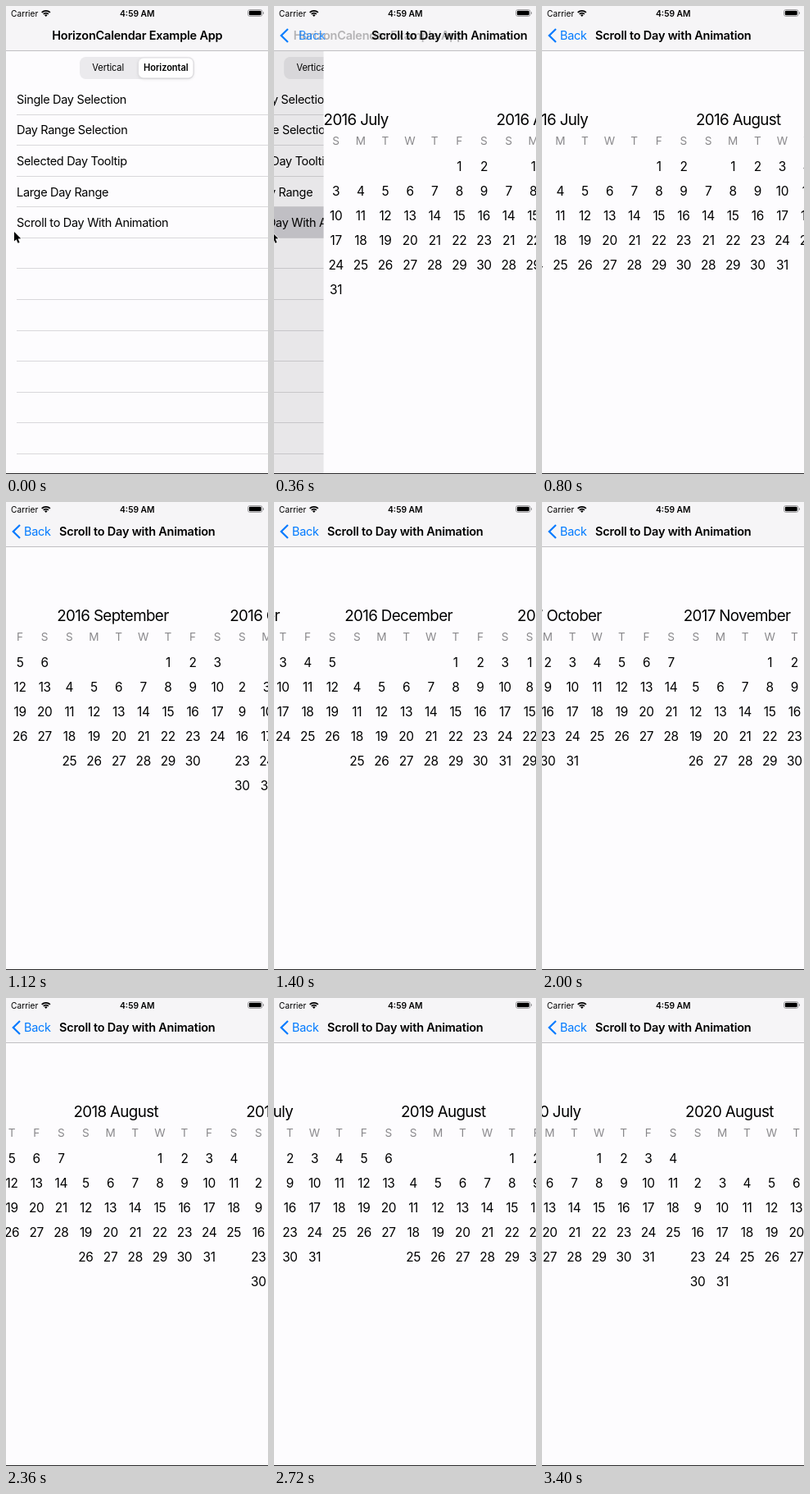
Recreate the animation shown at these times as an HTML page with a canvas. Size 320 px wide and 570 px high, loop 4.36 s.

```html
<!DOCTYPE html>
<html lang="en">
<head>
<meta charset="utf-8">
<style>
html, body { margin: 0; width: 100%; height: 100%; overflow: hidden; background: #fdfcfe; }
canvas { display: block; width: 320px; height: 570px; }
</style>
</head>
<body>
<canvas id="stage"></canvas>
<script>
const W = 320, H = 570, LOOP = 4360, STEP = 40;
const canvas = document.getElementById('stage');
const ratio = window.devicePixelRatio || 1;
canvas.width = W * ratio;
canvas.height = H * ratio;
const ctx = canvas.getContext('2d');

const PAPER = '#fdfcfe', BAR = '#f6f5f7', INK = '#000', BLUE = '#007aff';
const NAV_BOTTOM = 54.6, ROW = 37.55, LIST_TOP = 94.6;
const CELL = 30.13, MONTH = CELL * 7;
const ROWS = ['Single Day Selection', 'Day Range Selection', 'Selected Day Tooltip',
  'Large Day Range', 'Scroll to Day With Animation'];
const MONTHS = ['January', 'February', 'March', 'April', 'May', 'June', 'July',
  'August', 'September', 'October', 'November', 'December'];

const clamp = v => Math.max(0, Math.min(1, v));

function text(str, x, y, size, { weight = 400, color = INK, align = 'left', track = -0.022, alpha = 1 } = {}) {
  ctx.font = `${weight} ${size}px Inter, sans-serif`;
  ctx.letterSpacing = `${track * size}px`;
  ctx.textAlign = align;
  ctx.fillStyle = color;
  ctx.globalAlpha = alpha;
  ctx.fillText(str, x, y);
  ctx.globalAlpha = 1;
}

function rect(x, y, w, h, color) {
  ctx.fillStyle = color;
  ctx.fillRect(x, y, w, h);
}

function pill(x, y, w, h, r, color) {
  ctx.beginPath();
  ctx.roundRect(x, y, w, h, r);
  ctx.fillStyle = color;
  ctx.fill();
}

// Cubic bezier (.36, .66, .04, 1), solved for time by bisection.
function pushEase(x) {
  if (x <= 0 || x >= 1) return clamp(x);
  const at = (u, a, b) => 3 * (1 - u) ** 2 * u * a + 3 * (1 - u) * u * u * b + u ** 3;
  let lo = 0, hi = 1;
  for (let i = 0; i < 24; i++) {
    const mid = (lo + hi) / 2;
    if (at(mid, 0.36, 0.04) < x) lo = mid; else hi = mid;
  }
  return at(lo, 0.66, 1);
}

// Accelerating scroll: time, offset, speed in px per ms.
const KNOTS = [
  [689, 0, 0],
  [800, MONTH - 188, 0.41],
  [1400, 5 * MONTH - 86.2, 2.66],
  [2000, 16 * MONTH - 172.7, 4.84],
  [2720, 37 * MONTH - 155, 7.45]
];
const SCROLL_END = 48 * MONTH + 6.5 * CELL - W / 2;

function scrollAt(t) {
  if (t <= KNOTS[0][0]) return 0;
  const [lastTime, lastPos, lastSpeed] = KNOTS[KNOTS.length - 1];
  if (t >= lastTime) return Math.min(SCROLL_END, lastPos + lastSpeed * (t - lastTime));
  const i = KNOTS.findIndex(k => k[0] > t);
  const [t0, p0, v0] = KNOTS[i - 1], [t1, p1, v1] = KNOTS[i];
  const d = t1 - t0, u = (t - t0) / d, u2 = u * u, u3 = u2 * u;
  return (2 * u3 - 3 * u2 + 1) * p0 + (u3 - 2 * u2 + u) * d * v0 +
    (3 * u2 - 2 * u3) * p1 + (u3 - u2) * d * v1;
}

function drawList(shift, selected) {
  ctx.save();
  ctx.translate(-shift, 0);
  if (selected) rect(0, LIST_TOP + 4 * ROW, W, ROW, '#d1d0d5');
  for (let i = 0; i < 12; i++) {
    rect(13, Math.floor(LIST_TOP + (i + 1) * ROW), W - 13, 1, '#d9d8db');
    if (ROWS[i]) text(ROWS[i], 13, LIST_TOP + i * ROW + 24.3, 14.5);
  }
  pill(90, 62, 140, 27, 7.5, '#ebeaed');
  ctx.shadowColor = 'rgba(0,0,0,.14)';
  ctx.shadowBlur = 4;
  ctx.shadowOffsetY = 1;
  pill(162, 63.5, 66.5, 24, 6, '#fffeff');
  ctx.shadowColor = 'transparent';
  text('Vertical', 124.7, 79.4, 11.1, { align: 'center', track: -0.01 });
  text('Horizontal', 195.3, 79.4, 11.1, { weight: 600, align: 'center', track: -0.008 });
  ctx.restore();
}

function drawMonth(index, x) {
  const year = 2016 + Math.floor((index + 6) / 12), month = (index + 6) % 12;
  const first = new Date(year, month, 1).getDay();
  const days = new Date(year, month + 1, 0).getDate();
  const column = c => x + (c + 0.5) * CELL;
  text(`${year} ${MONTHS[month]}`, x, 145, 18.8, { track: -0.034 });
  [...'SMTWTFS'].forEach((letter, c) =>
    text(letter, column(c), 169, 13.6, { color: '#89888b', align: 'center', track: 0 }));
  for (let day = 1; day <= days; day++) {
    const slot = first + day - 1;
    text(day, column(slot % 7), 200.5 + Math.floor(slot / 7) * 30.08, 15.4, { align: 'center' });
  }
}

function drawCalendar(left, scroll) {
  rect(left, 0, W - left, H, PAPER);
  const start = Math.floor(scroll / MONTH);
  for (let i = start; i * MONTH - scroll < W; i++) drawMonth(i, left + i * MONTH - scroll);
}

function drawStatus() {
  text('Carrier', 6, 12.6, 10.2, { track: 0 });
  text('4:59 AM', 160.3, 12.6, 10.3, { weight: 600, align: 'center', track: 0 });
  ctx.strokeStyle = ctx.fillStyle = INK;
  ctx.lineWidth = 1.8;
  const from = -Math.PI * 0.75, to = -Math.PI * 0.25;
  for (const r of [7.2, 4.3]) {
    ctx.beginPath();
    ctx.arc(48.8, 13, r, from, to);
    ctx.stroke();
  }
  ctx.beginPath();
  ctx.moveTo(48.8, 13);
  ctx.arc(48.8, 13, 2.5, from, to);
  ctx.fill();
  ctx.beginPath();
  ctx.roundRect(295.5, 4.5, 17.5, 8, 2.4);
  ctx.lineWidth = 0.8;
  ctx.strokeStyle = '#8a898c';
  ctx.stroke();
  pill(296.8, 5.8, 14.9, 5.4, 1.3, INK);
  pill(313.9, 7.2, 1, 2.6, 0.5, '#8a898c');
}

function drawNav(p) {
  rect(0, 0, W, NAV_BOTTOM, BAR);
  rect(0, 54, W, 1, '#c0bfc2');
  const rest = 1 - p;
  const title = { weight: 600, align: 'center', track: -0.015 };
  if (rest > 0) {
    text('HorizonCalendar Example App', 160.3 - 40 * p, 41, 14.5, { ...title, alpha: clamp(rest * 1.4) });
  }
  if (p > 0) {
    text('Scroll to Day with Animation', 160.3 + 285 * rest, 41, 14.5, { ...title, alpha: clamp(p * 1.2) });
    text('Back', 22 + 42 * rest, 41, 14.5, { color: BLUE, alpha: p });
    ctx.globalAlpha = clamp(p * 1.2);
    ctx.beginPath();
    ctx.moveTo(17, 28);
    ctx.lineTo(8.8, 36);
    ctx.lineTo(17, 44);
    ctx.strokeStyle = BLUE;
    ctx.lineWidth = 2.2;
    ctx.stroke();
    ctx.globalAlpha = 1;
  }
  drawStatus();
}

function drawCursor(x, y) {
  ctx.save();
  ctx.translate(x, y);
  ctx.beginPath();
  [[0, 0], [0, 11.5], [2.6, 9.2], [4.6, 13.8], [6.6, 12.9], [4.7, 8.5], [8.2, 8.2]]
    .forEach(([px, py]) => ctx.lineTo(px, py));
  ctx.closePath();
  ctx.lineWidth = 1.4;
  ctx.strokeStyle = '#fff';
  ctx.stroke();
  ctx.fillStyle = INK;
  ctx.fill();
  ctx.restore();
}

function draw(t) {
  ctx.setTransform(ratio, 0, 0, ratio, 0, 0);
  const p = pushEase((t - 203) / 500);
  rect(0, 0, W, H, PAPER);
  if (p < 1) {
    drawList(0.3 * W * p, t >= 40);
    rect(0, 0, W, H, `rgba(0,0,0,${0.1 * p})`);
  }
  if (p > 0) drawCalendar(W * (1 - p), scrollAt(t));
  drawNav(p);
  const cursorX = 10 - 13 * Math.max(0, (t - 200) / 160);
  if (cursorX > -10) drawCursor(cursorX, 275);
  rect(0, 569, W, 1, '#2a292b');
}

// The picture advances in discrete 40 ms steps.
const begin = performance.now();
function tick() {
  const t = (performance.now() - begin) % LOOP;
  draw(Math.floor(t / STEP) * STEP);
  requestAnimationFrame(tick);
}
tick();
</script>
</body>
</html>
```
